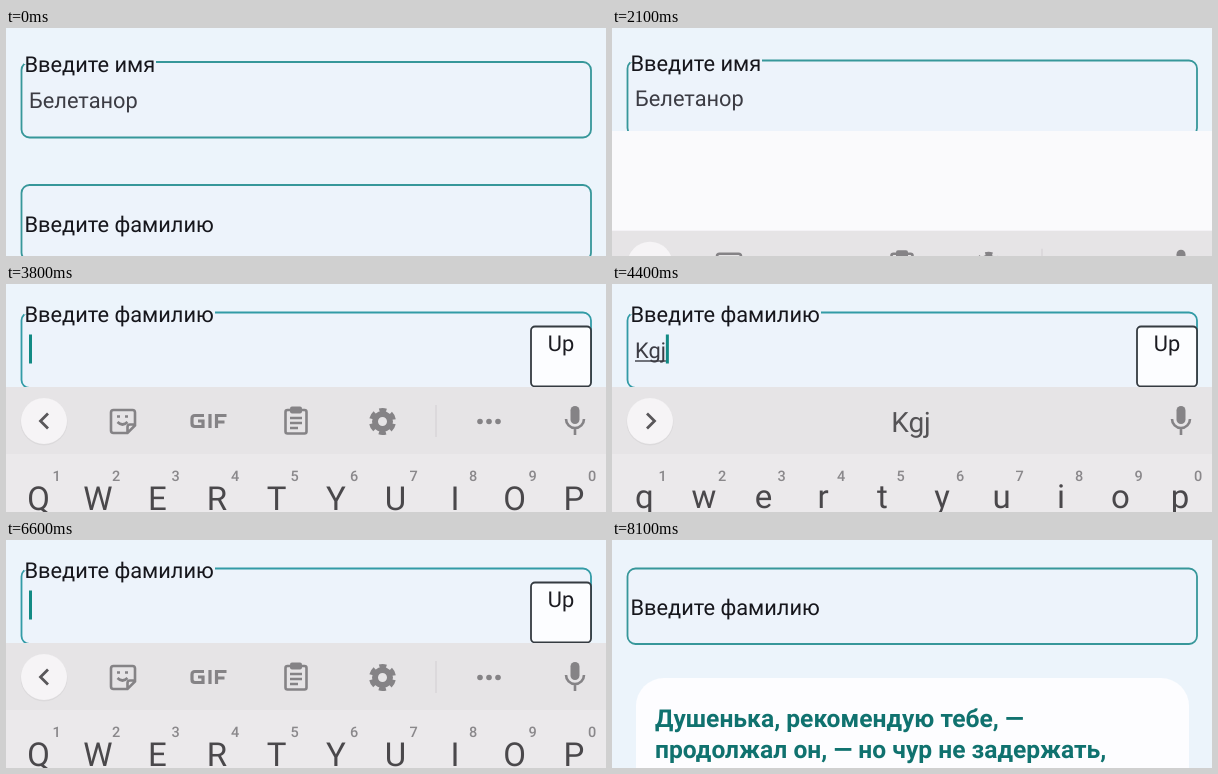
An HTML page that plays this animation: 600 px wide and 228 px high, repeating every 8200 ms.

```html
<!DOCTYPE html>
<html lang="ru">
<head>
<meta charset="utf-8">
<style>
  html, body { margin: 0; height: 100%; overflow: hidden; background: #ecf4fb; }
  svg { display: block; width: 100vw; height: 100vh; font: 21.8px Roboto, sans-serif; }
  text { white-space: pre; text-rendering: geometricPrecision; }
  .box { fill: #edf3fb; stroke: #37979a; stroke-width: 1.8; }
  .focus .box { stroke: #329ba6; }
  .gap { fill: #ecf4fb; }
  .label { fill: #16161c; }
  .value { fill: #3c3c44; }
  .card { font-weight: 700; font-size: 24.6px; fill: #10726f; }
  .icon { fill: none; stroke: #858386; stroke-width: 2.6; }
  .solid { fill: #858386; }
  .key { font-size: 33px; fill: #4a484b; text-anchor: middle; }
  .digit { font-size: 14.5px; font-weight: 500; fill: #8a888b; text-anchor: middle; }
</style>
</head>
<body>
<svg viewBox="0 0 600 228" preserveAspectRatio="none">
  <g id="page">
    <g transform="translate(0 32.5)">
      <rect class="box" x="15.5" width="569.5" height="75.5" rx="8"/>
      <rect class="gap" x="18" y="-2" width="132" height="4"/>
      <text class="label" x="18.5" y="10">Введите имя</text>
      <text class="value" x="23" y="45.5">Белетанор</text>
    </g>
    <g id="surname" transform="translate(0 155.5)">
      <rect class="box" x="15.5" width="569.5" height="75.5" rx="8"/>
      <rect id="gap" class="gap" x="18" y="-2" width="191" height="4"/>
      <text id="label" class="label" x="18.5">Введите фамилию</text>
      <text id="value" class="value" x="23" y="45.2"></text>
      <rect id="underline" x="23" y="47.8" height="1.4" fill="#3c3c44"/>
      <rect id="cursor" y="22" width="3" height="29" fill="#128a84"/>
    </g>
    <rect x="24" y="265" width="553" height="240" rx="28" fill="#fdfdff"/>
    <text class="card" x="43" y="314">Душенька, рекомендую тебе, —</text>
    <text class="card" x="43" y="344.5">продолжал он, — но чур не задержать,</text>
  </g>
  <g id="up">
    <rect x="525" y="42.5" width="60" height="60" rx="4" fill="#fcfdff" stroke="#353b41" stroke-width="1.8"/>
    <text x="555" y="67" text-anchor="middle" fill="#1c1c22">Up</text>
  </g>
  <rect id="blank" y="103" width="600" height="125" fill="#fafafc"/>
  <g id="keyboard">
    <rect y="103" width="600" height="125" fill="#ebe9eb"/>
    <rect y="103" width="600" height="67" fill="#e6e4e6"/>
    <circle cx="38" cy="138" r="23.5" fill="#dcdadc"/>
    <circle cx="38" cy="137" r="23" fill="#f6f4f6"/>
    <path id="chevron" d="M42 129.500l-7.500 7.500 7.500 7.500" fill="none" stroke="#59575a" stroke-width="2.800"/>
    <g id="tools">
      <g class="icon">
        <path d="M107.500 126h19q2.500 0 2.500 2.500v13l-7.500 7.500h-14q-2.500 0-2.500-2.500v-18q0-2.500 2.500-2.500zM129 140.500h-5q-2.500 0-2.500 2.500v6"/>
        <path d="M111.500 138q5 5 10 0M111 132.500h3M119 132.500h3"/>
        <rect x="279.500" y="126" width="21" height="23.500" rx="2"/>
        <path d="M284 134h12M284 139h12M284 144h8"/>
        <path d="M198 131.500h-9q-3 0-3 3v5q0 3 3 3h8v-5.500h-5M204 130v14M210.500 144v-12.500h10M210.500 138h8" stroke-width="3.200"/>
        <circle cx="376.500" cy="137.500" r="7.500" stroke-width="6"/>
        <circle cx="376.500" cy="137.500" r="11.500" stroke-width="4" stroke-dasharray="7 5.043" stroke-dashoffset="-2.500"/>
      </g>
      <g class="solid">
        <rect x="284" y="122.500" width="12" height="7" rx="2"/>
        <circle cx="474" cy="137.500" r="2.800"/>
        <circle cx="483" cy="137.500" r="2.800"/>
        <circle cx="492" cy="137.500" r="2.800"/>
      </g>
      <path d="M430 121v32" stroke="#d8d6d8" stroke-width="1.500"/>
    </g>
    <text id="hint" x="299" y="147.500" font-size="28" text-anchor="middle" fill="#555356"></text>
    <rect class="solid" x="564.500" y="122" width="9" height="18" rx="4.500"/>
    <path class="icon" d="M560 135a9 9 0 0 0 18 0M569 144v7"/>
    <g id="keys"></g>
  </g>
</svg>
<script>
const LOOP = 8200, WORD = 'Kgjbjb', ROW = 'QWERTYUIOP';
const $ = id => document.getElementById(id);
const ease = (t, start, length) => {
  const u = Math.min(1, Math.max(0, (t - start) / length));
  return u * u * (3 - 2 * u);
};
const show = (id, on) => $(id).style.display = on ? '' : 'none';
const move = (id, y) => $(id).setAttribute('transform', `translate(0 ${y})`);

$('keys').innerHTML = [...ROW].map((c, i) => {
  const x = 32.5 + i * 59.5;
  return `<text class="key" x="${x}">${c}</text>
    <text class="digit" x="${x + 18}" y="196.5">${(i + 1) % 10}</text>`;
}).join('');
const keys = [...document.querySelectorAll('.key')];

// Letters present: one typed each 160 ms, then one erased each 150 ms
function typed(t) {
  if (t < 4000) return 0;
  if (t < 5750) return Math.min(6, 1 + Math.floor((t - 4000) / 160));
  return Math.max(0, 5 - Math.floor((t - 5750) / 150));
}

function cursorOn(t) {
  if (t < 2500 || t >= 7000) return false;
  if (t < 4000) return (t - 2500) % 1000 < 500;
  if (t < 4800) return true;
  if (t < 5750) return (t - 4800) % 1000 < 500;
  return true;
}

function draw(t) {
  const focused = t >= 1800 && t < 7050;
  const raised = ease(t, 1800, 200) - ease(t, 7050, 200);
  const open = ease(t, 2000, 350) - ease(t, 7000, 350);
  const word = WORD.slice(0, typed(t));

  move('page', 1.5 * (1 - ease(t, 50, 550)) - 127 * ease(t, 2150, 350));
  $('surname').setAttribute('class', focused ? 'focus' : '');
  $('label').setAttribute('y', 46.5 - 36.8 * raised);
  show('gap', raised > 0.8);

  $('value').textContent = $('hint').textContent = word;
  const width = word ? $('value').getComputedTextLength() : 0;
  $('underline').setAttribute('width', width);
  $('cursor').setAttribute('x', 23 + width);
  show('cursor', cursorOn(t));

  show('up', t >= 2250 && t < 7050);
  show('blank', t >= 2000 && t < 2400);
  move('keyboard', 125 * (1 - open));
  show('keyboard', open > 0);
  show('tools', !word);
  $('chevron').setAttribute('transform', word ? 'translate(77 0) scale(-1 1)' : '');
  keys.forEach((key, i) => {
    key.textContent = word ? ROW[i].toLowerCase() : ROW[i];
    key.setAttribute('y', word ? 224 : 226);
  });
}

const begin = performance.now();
function frame() {
  draw((performance.now() - begin) % LOOP);
  requestAnimationFrame(frame);
}
frame();
</script>
</body>
</html>
```
